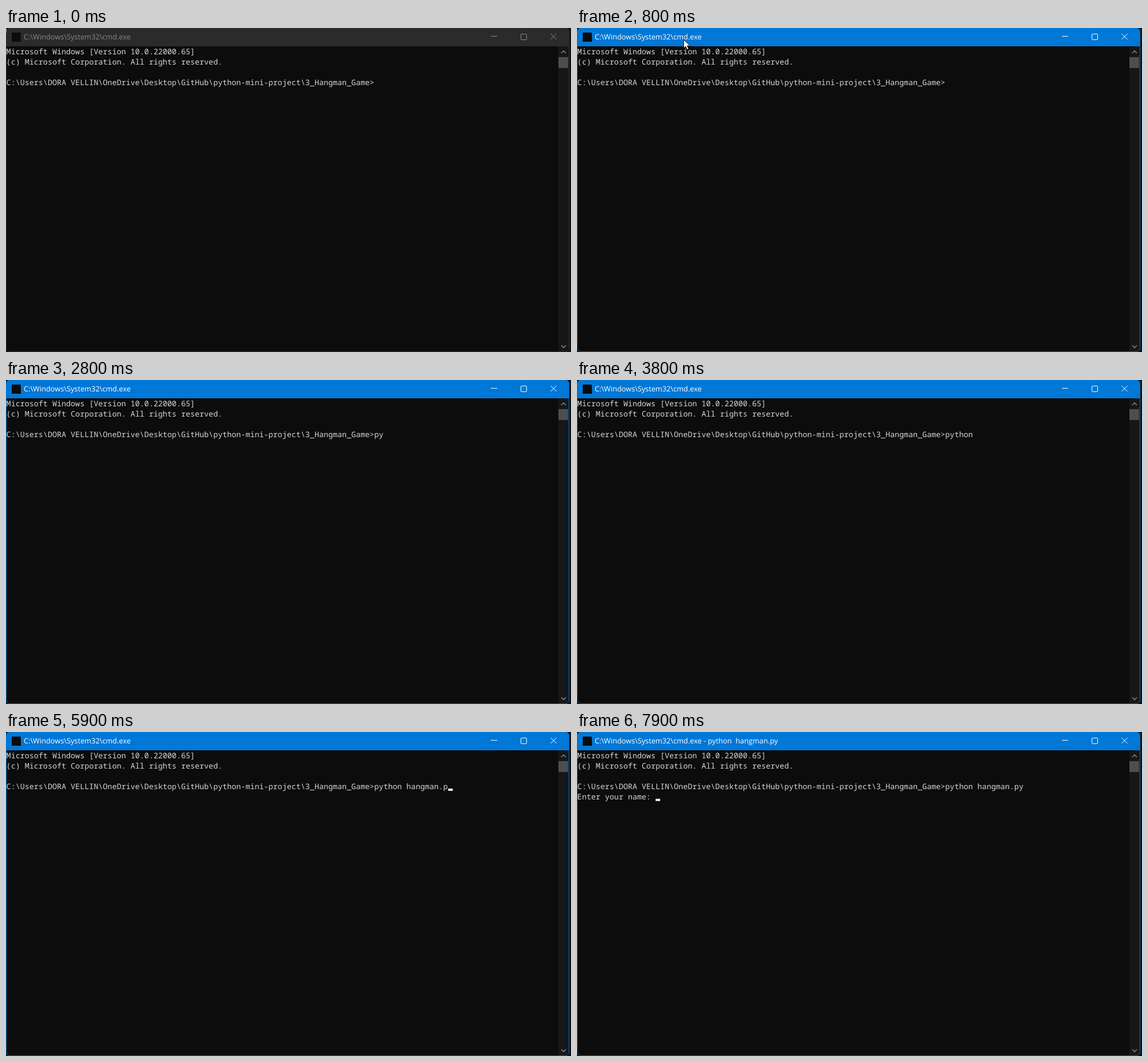
Animation, 987 px wide and 567 px high, one loop 8000 ms. Source, as an HTML page:

```html
<!DOCTYPE html>
<html lang="en">
<head>
<meta charset="utf-8">
<title>Command prompt</title>
<style>
  html, body { margin: 0; width: 100%; height: 100%; overflow: hidden; background: #10131a; }
  svg { display: block; }
  text { white-space: pre; text-rendering: geometricPrecision; }
  .term { font: 13.4px "Noto Sans Mono", monospace; fill: #d6d6d6; }
  .title { font: 12.75px "Open Sans", sans-serif; }
  .line { fill: none; stroke-width: 1; }
</style>
</head>
<body>
<svg width="987" height="567" viewBox="0 0 987 567">
  <defs>
    <clipPath id="frame"><rect width="984" height="567" rx="7"/></clipPath>
  </defs>
  <rect width="987" height="567" fill="#10131a"/>
  <g clip-path="url(#frame)">
    <rect width="984" height="567" fill="#0c0c0c"/>
    <rect id="bar" width="984" height="32"/>
    <rect x="965" y="32" width="18" height="535" fill="#171717"/>
    <rect x="965" y="51" width="17" height="19" fill="#4d4d4d"/>
    <path d="M970 44l4-4 4 4M970 555.500l4 4 4-4" class="line" stroke="#8c8c8c" style="stroke-width:1.4"/>
  </g>
  <rect id="edge" x=".5" y="-.5" width="983" height="567" rx="7" class="line"/>
  <rect id="behind" y="1" width="1" height="7" fill="#c98a50"/>
  <rect x="10" y="8" width="16" height="16" fill="#0c0c0c"/>
  <text id="title" class="title" x="31" y="20.400"></text>
  <g id="buttons" class="line">
    <path d="M847 14.500h11M951.500 10l10 10M961.500 10l-10 10"/>
    <rect x="899.500" y="10.500" width="10" height="10" rx="1.300"/>
  </g>
  <g id="rows"></g>
  <rect id="caret" width="8" height="4" fill="#f2f2f2"/>
  <path id="mouse" d="M.5 .5V15.200L3.900 12 6.300 17.600 8.900 16.500 6.500 11H11.200Z" fill="#fff" stroke="#111" stroke-width=".9"/>
</svg>
<script>
const $ = id => document.getElementById(id);
const LOOP = 8000, STEP = 100;
const CELL = 8.04, ROW = 17.85, LEFT = 0.6, BASE = 46.1;
const PATH = "C:\\Users\\DORA VELLIN\\OneDrive\\Desktop\\GitHub\\python-mini-project\\3_Hangman_Game>";
const QUESTION = "Enter your name: ";
const SHELL = "C:\\Windows\\System32\\cmd.exe";
const ACTIVE = 800, ENTER = 6700, ASK = 6800;
const BLINK = 508, FIRST_BLINK = 1210;

// Each burst of typing has a start and a steady pace.
const BURSTS = [
  { text: "p", start: 2450, pace: 0 },
  { text: "ython", start: 2710, pace: 125 },
  { text: " ", start: 3650, pace: 0 },
  { text: "hangman", start: 4450, pace: 135 },
  { text: ".py", start: 5505, pace: 395 }
];
const KEYS = BURSTS.flatMap(({ text, start, pace }) =>
  [...text].map((letter, i) => ({ letter, at: start + i * pace })));

const rows = Array.from({ length: 5 }, (_, i) => {
  const row = document.createElementNS("http://www.w3.org/2000/svg", "text");
  row.setAttribute("class", "term");
  row.setAttribute("x", LEFT);
  row.setAttribute("y", BASE + i * ROW);
  return $("rows").appendChild(row);
});
rows[0].textContent = "Microsoft Windows [Version 10.0.22000.65]";
rows[1].textContent = "(c) Microsoft Corporation. All rights reserved.";

const set = (id, name, value) => $(id).setAttribute(name, value);
const show = (id, on) => set(id, "visibility", on ? "visible" : "hidden");
const blinks = t => Math.floor((t - FIRST_BLINK) / BLINK);

// The caret lights up at every input and then toggles on each blink.
function caretOn(t, lastInput) {
  return t >= ACTIVE && (blinks(t) - blinks(lastInput)) % 2 === 0;
}

function pointer(t) {
  if (t < 100 || t >= 1000) return null;
  if (t >= 900) return [294, -6];
  const left = 1 - Math.min(1, (t - 100) / 600);
  const k = left * left;
  return [186 + 690 * k, 20 + 530 * k];
}

function draw(time) {
  const t = Math.floor(time / STEP) * STEP;
  const active = t >= ACTIVE, entered = t >= ENTER, asked = t >= ASK;
  const typed = KEYS.filter(key => key.at <= t);

  set("bar", "fill", active ? "#0078d7" : "#2b2b2b");
  set("edge", "stroke", active ? "#006fc6" : "#303030");
  set("title", "fill", active ? "#fff" : "#868686");
  set("buttons", "stroke", active ? "#fff" : "#8c8c8c");
  show("behind", !active);
  $("title").textContent = SHELL + (entered ? " - python  hangman.py" : "");

  rows[3].textContent = PATH + typed.map(key => key.letter).join("");
  rows[4].textContent = asked ? QUESTION : "";

  const col = asked ? QUESTION.length : PATH.length + typed.length;
  const lastInput = asked ? ASK : typed.length ? typed[typed.length - 1].at : FIRST_BLINK;
  set("caret", "x", LEFT + col * CELL);
  set("caret", "y", 99 + (asked ? ROW : 0));
  show("caret", caretOn(t, lastInput) && (asked || !entered));

  const at = pointer(t);
  show("mouse", at);
  if (at) set("mouse", "transform", `translate(${at[0]} ${at[1]})`);
}

const start = performance.now();
function tick() {
  draw((performance.now() - start) % LOOP);
  requestAnimationFrame(tick);
}
tick();
</script>
</body>
</html>
```
